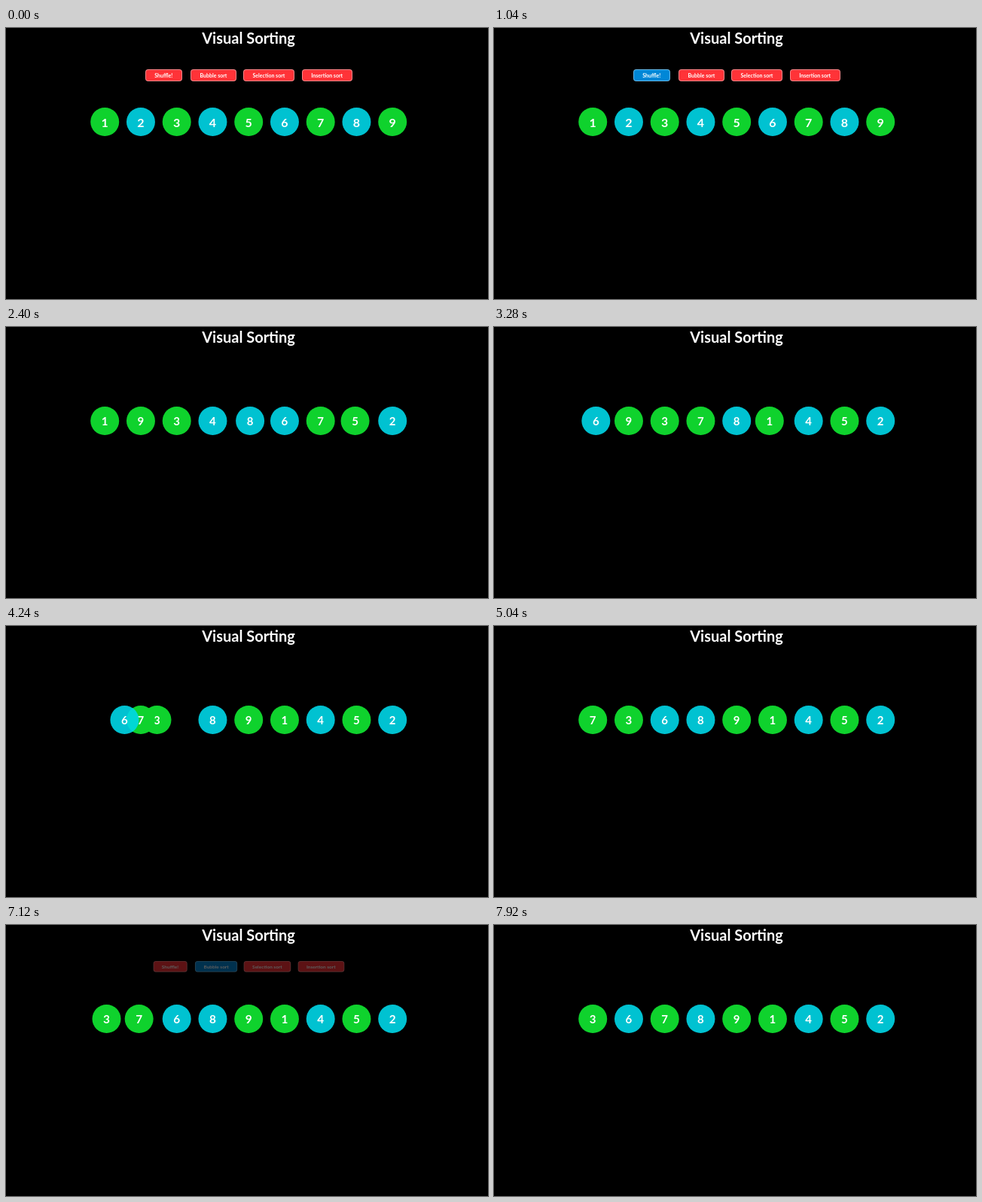
Recreate the animation shown at these times as an HTML page. Size 640 by 361 pixels, loop 8000 ms.

```html
<!DOCTYPE html>
<html lang="en">
<head>
<meta charset="utf-8">
<title>Visual Sorting</title>
<style>
  html, body { margin: 0; width: 100%; height: 100%; overflow: hidden; background: #000; }
  body { position: relative; font-family: Lato, sans-serif; font-weight: bold; color: #fff; }
  h1 { position: absolute; left: 0; top: 1px; width: 644px; margin: 0; font-size: 20px; line-height: 24px; text-align: center; }
  #menu { position: absolute; left: 0; top: 55px; width: 644px; height: 16px; }
  .button {
    position: absolute; top: 0; height: 16px; box-sizing: border-box;
    border: 1px solid rgba(255, 255, 255, .4); border-radius: 4px;
    background: #ff3338;
    font-size: 7px; line-height: 14px; text-align: center; white-space: nowrap;
  }
  .button.hover { background: #0087d7; }
  .ball {
    position: absolute; left: -19px; top: 106px; width: 38px; height: 38px;
    border-radius: 50%; background: #0fd22d; line-height: 39px; text-align: center;
  }
  .ball.even { background: rgba(0, 215, 232, .9); }
</style>
</head>
<body>
<h1>Visual Sorting</h1>
<div id="menu"></div>
<script>
  const LOOP = 8000, STEP = 80, SWAP_TIME = 440, FADE_TIME = 500;
  const COUNT = 9, FIRST_X = 131.2, GAP = 47.75;

  // start time, left slot, right slot, stacking of the ball leaving the right slot
  const swaps = [
    [1563, 1, 8, 2], [2026, 4, 7, 2], [2470, 3, 6, 2], [2915, 0, 5, 2],
    [3355, 1, 4, 2], [3795, 1, 3, 2], [4156, 0, 2, 0], [4596, 0, 1, 2],
    [6800, 0, 1, 2], [7240, 1, 2, 2]
  ];
  const buttons = [
    { label: "Shuffle!", x: 184.5, width: 49.5, hover: [840, 2400] },
    { label: "Bubble sort", x: 245, width: 61, hover: [5920, 8000] },
    { label: "Selection sort", x: 315, width: 68 },
    { label: "Insertion sort", x: 392.5, width: 67.5 }
  ];

  const clamp = v => Math.min(1, Math.max(0, v));
  const ramp = (t, start, length) => clamp((t - start) / length);
  const slotX = slot => FIRST_X + GAP * slot;

  // Same curve as the CSS "ease" timing function.
  function ease(x) {
    const bezier = (u, a, b) => 3 * u * (1 - u) * ((1 - u) * a + u * b) + u ** 3;
    let low = 0, high = 1;
    for (let i = 0; i < 20; i++) {
      const mid = (low + high) / 2;
      if (bezier(mid, .25, .25) < x) low = mid; else high = mid;
    }
    return bezier(low, .1, 1);
  }

  function addBox(parent, className, text) {
    const box = document.createElement("div");
    box.className = className;
    box.textContent = text;
    return parent.appendChild(box);
  }

  const menu = document.getElementById("menu");
  for (const button of buttons) {
    button.node = addBox(menu, "button", button.label);
    button.node.style.left = button.x + "px";
    button.node.style.width = button.width + "px";
  }
  const balls = Array.from({ length: COUNT }, (_, i) =>
    addBox(document.body, i % 2 ? "ball even" : "ball", i + 1));

  function placeBalls(t, fontSize) {
    const order = balls.slice();
    const x = new Map(order.map((ball, i) => [ball, slotX(i)]));
    const depth = new Map();
    for (const [start, a, b, rightDepth] of swaps) {
      if (t < start) break;
      const left = order[a], right = order[b];
      const shift = ease(ramp(t, start, SWAP_TIME)) * (b - a) * GAP;
      x.set(left, slotX(a) + shift);
      x.set(right, slotX(b) - shift);
      if (t < start + SWAP_TIME) {
        depth.set(left, 3);
        depth.set(right, rightDepth);
      }
      order[a] = right;
      order[b] = left;
    }
    for (const ball of balls) {
      ball.style.transform = `translateX(${x.get(ball)}px)`;
      ball.style.zIndex = depth.get(ball) ?? 1;
      ball.style.fontSize = fontSize + "px";
    }
  }

  function draw(now) {
    const t = Math.floor((now % LOOP) / STEP) * STEP;
    const hidden = ramp(t, 1560, FADE_TIME) - ramp(t, 5040, FADE_TIME) + ramp(t, 6800, FADE_TIME);
    menu.style.opacity = 1 - hidden;
    menu.style.transform = `translateY(${-12 * hidden}px) scale(${1 - .12 * hidden})`;
    for (const { node, hover } of buttons) {
      node.classList.toggle("hover", !!hover && t >= hover[0] && t < hover[1]);
    }
    placeBalls(t, 16 - hidden);
  }

  const origin = performance.now();
  function tick() {
    draw(performance.now() - origin);
    requestAnimationFrame(tick);
  }
  tick();
</script>
</body>
</html>
```
